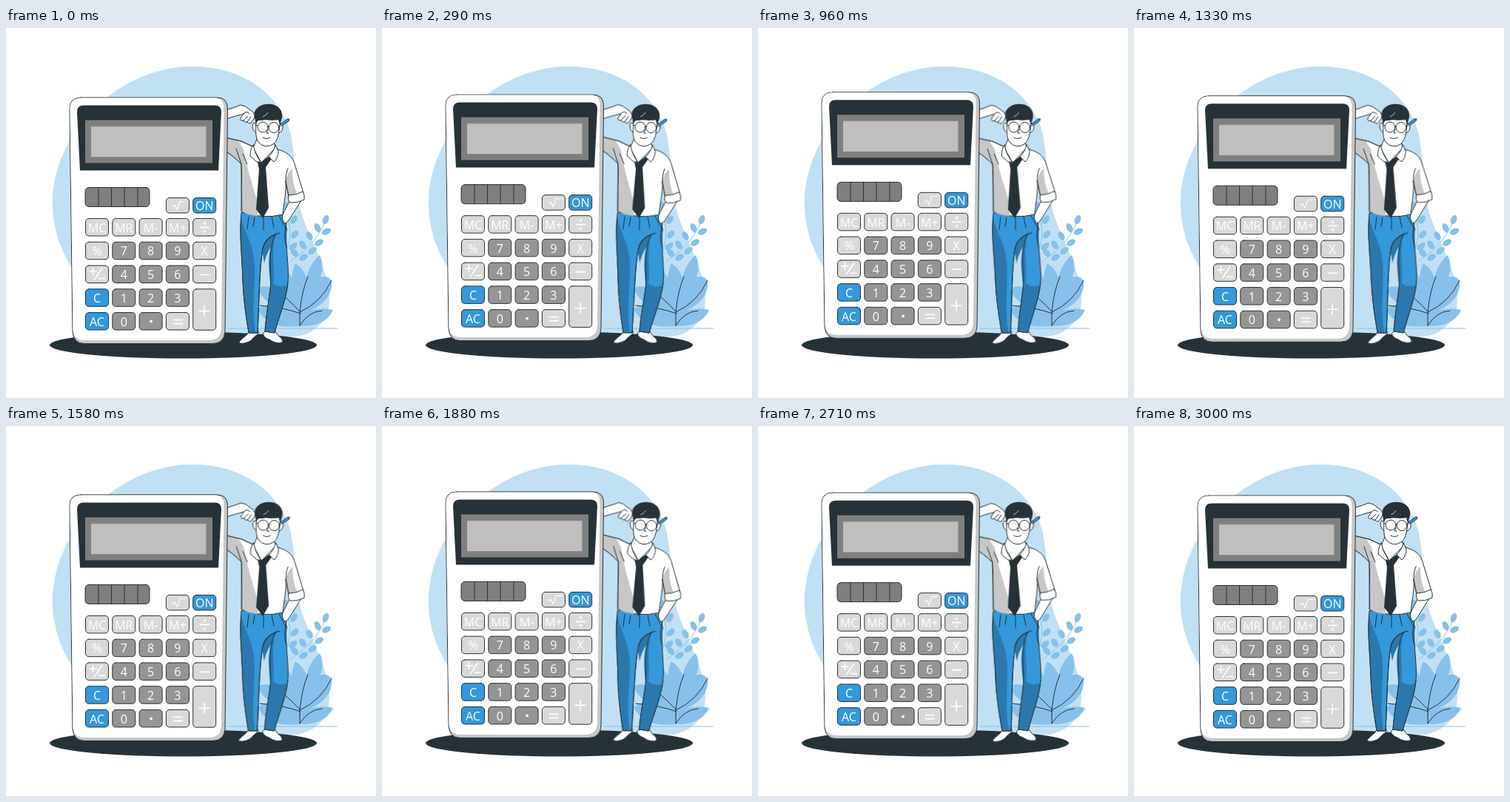
These frames come from a looping animation (500x500 px, 3.04 s). An HTML page:

```html
<!DOCTYPE html>
<html lang="en">
<head>
<meta charset="utf-8">
<title>Calculator</title>
<style>
html, body { margin: 0; width: 100%; height: 100%; overflow: hidden; background: #fff; }
svg { display: block; width: 100vw; height: 100vh; }
#calc { animation: floating 3040ms linear infinite; }
#man { transform-origin: 350px 265px; animation: sway 3040ms linear infinite; }
/* Two 1500 ms cycles, then a 40 ms rest. */
@keyframes floating {
  0%, 49.342%, 98.684%, 100% { transform: translateY(0); }
  24.671%, 74.013% { transform: translateY(-10px); }
}
@keyframes sway {
  0%, 98.684%, 100% { transform: rotate(0deg); }
  12.336%, 61.678% { transform: rotate(1deg); }
  37.007%, 86.349% { transform: rotate(-1deg); }
}
.ink { stroke: #263238; stroke-width: 1; stroke-linecap: round; stroke-linejoin: round; }
.line { fill: none; }
.white { fill: #fff; }
.grey { fill: #c7c7c7; }
.dark { fill: #263238; }
.blue { fill: #3498db; }
.shade { fill: #2a78ae; }
.sign { fill: none; stroke: #fff; stroke-width: 1.6; }
.thin { stroke-width: 1.1; }
text { font: 16px "Open Sans", "Noto Sans", sans-serif; fill: #fff; text-anchor: middle; }
</style>
</head>
<body>
<svg viewBox="0 0 500 500">
  <path fill="#c1e0f4" d="M63 237C63 140 153 52 252 52C316 52 364 84 382 134C393 170 388 213 400 253C413 290 436 329 437 364C438 398 414 418 380 418H210C130 384 63 322 63 237Z"/>

  <g id="plant" fill="#87c1eb">
    <path d="M397 387C384 362 383 334 391 318C399 323 403 329 406 337C409 325 415 314 424 307C429 317 428 328 425 337C431 334 437 337 440 342C442 359 430 374 411 382Q427 377 442 381C435 397 418 404 397 403C375 405 353 404 340 380C347 374 356 374 365 377C352 370 343 362 340 351C354 347 368 350 379 362C374 351 374 335 378 325C390 341 397 362 397 387Z"/>
    <path fill="none" stroke="#87c1eb" d="M384 316C398 305 420 291 433 258M378 304Q389 282 378 240M300 406H448"/>
    <g id="buds"></g>
    <path class="ink line" d="M397 402V384Q400 354 408 336M397 384Q426 371 440 341M398 384Q379 364 365 354M398 386Q378 378 343 375M397 402Q409 383 427 382"/>
  </g>

  <ellipse class="dark" cx="239.5" cy="428.5" rx="180.5" ry="18"/>

  <g id="man">
    <!-- shoes -->
    <path class="ink white" d="M328 410L326 414Q319 420 315 424Q315 427 322 426Q331 424 334 419L341 413V410Z"/>
    <path class="ink white" d="M350 410L347 413Q349 419 356 421Q364 427 373 425Q375 423 372 419Q367 416 364 410Z"/>
    <!-- trousers -->
    <path class="ink blue" d="M318 250C315 276 319 307 320 340C321 369 325 393 328 412H340C342 376 342 328 347 298C350 287 357 282 364 279C352 305 360 329 357 354C354 376 351 394 350 410L363 412C369 389 379 366 381 344C383 321 377 295 379 271L376 250Z"/>
    <path class="shade" d="M318.500 258C322 277 336 293 336 325C336 359 332 384 337 411.500H328.500C325 390 321.500 361 320.500 338C319.500 309 316 285 318.500 258Z"/>
    <path class="shade" d="M368 276C355 282 348 288 346 300L349 318C352 303 359 294 363 288C358 308 364 326 361 345C371 353 377 347 380 348C378 368 368 391 363 411.500L350.500 410C352 389 357 370 357.500 348C355 322 351 299 368 276Z"/>
    <path class="ink line" d="M318 258C315 276 319 307 320 340C321 369 325 393 328 412H340C342 376 342 328 347 298C350 287 357 282 364 279C352 305 360 329 357 354C354 376 351 394 350 410L363 412C369 389 379 366 381 344"/>
    <path class="ink line" d="M328 255L326 272M336 256L334 268M348 256V273M359 255L362 270M347 298C349 286 358 280 370 277M369 254Q376 268 380 273M379 264Q374 282 379 296"/>
    <!-- forearm in pocket -->
    <path class="ink white" d="M383 234L374 252Q372 259 377 264Q380 263 382 260L399 233Z"/>
    <!-- shirt -->
    <path class="ink white" d="M288 146L318 153L333 160L341 163L367 164C381 168 388 174 391 187L402 223L382 228L378 207C379 224 375 238 374 252Q346 259 319 248C319 225 319 204 318 184Q306 171 288 161Z"/>
    <path class="grey" d="M288 146.500L314 152.500L321 164C325 186 331 207 341 238L340 254Q327 253 319.500 248C319.500 225 319.500 204 318.500 184Q306 171 288 160.500Z"/>
    <path class="grey" d="M378 207Q380 196 387 190Q386 206 393 224L382 228Z"/>
    <path class="ink line" d="M288 146L318 153L333 160M288 161Q306 171 318 184V248M318 184L311 163M326 184L320 170M378 208Q378 196 381 190M378 207L382 227"/>
    <path class="ink white" d="M382 226Q392 226 401 221Q404 225 403 232Q394 237 384 236Q380 232 382 226Z"/>
    <!-- neck, tie, collar -->
    <path class="ink white" d="M339 150L334 162L345 182L364 162L361 150Z"/>
    <path class="dark" d="M339 176L344 182L357 172L358 178L351 188L355 243L347 257L338 245L342 191Z"/>
    <path class="ink white" d="M334 158Q330 164 330 173L339 181L344 181Q336 170 334 158ZM364 158Q362 167 355 174L362 181Q368 175 368 167Z"/>
    <!-- head -->
    <path class="ink white" d="M338 129Q333 126 333 133Q334 141 339 141ZM370 129Q375 127 374 135Q373 141 368 142Z"/>
    <path class="ink white" d="M338 120C338 134 336 148 341 154Q350 164 361 157C369 151 369 138 371 122Z"/>
    <path class="dark" d="M338 130L336 121C333 112 341 104 351 103C364 101 375 109 373 121L370 131L368 124C359 126 350 123 346 125Q341 124 339 127Z"/>
    <path fill="none" stroke="#fff" stroke-width=".7" d="M347 120Q352 118 354 114"/>
    <g class="ink" fill="#fff">
      <circle cx="347" cy="134" r="7"/>
      <circle cx="362" cy="134.500" r="7"/>
    </g>
    <path class="ink line" d="M354 133Q355 131 356 133M340 132L337 131M369 133L371 132M354 137L352 142H355M347 148Q352 151 357 148"/>
    <path class="ink blue" d="M371 130L380 123L383 123L382 126L373 132Z"/>
    <!-- raised hand -->
    <path class="ink white" d="M288 116L300 110Q310 107 317 104Q324 105 329 110Q335 113 336 118C336 122 334 124 332 127Q329 131 326 127Q323 128 321 125Q316 126 317 122L321 116L314 118Q303 121 288 126Z"/>
    <path class="ink line" d="M321 116Q325 111 329 116M321 125L327 119M326 127L331 120"/>
  </g>

  <g id="calc">
    <path class="ink" fill="#c7c7c7" d="M101 94H285Q300 94 299.500 110L296 410Q295 426.500 279 426.500H106Q91 426.500 90 410L86 109Q86 94 101 94Z"/>
    <path class="white" d="M101 94.500H283Q295 95 294.500 110L291 406Q290 422 275 422H106Q91 421.500 90.500 408L86.500 109Q86.500 94.500 101 94.500Z"/>
    <path class="dark" d="M105 104.500H282Q291 104.500 291 113L287 192.500H100L96 113Q96 104.500 105 104.500Z"/>
    <path fill="#7f7f7f" d="M107 124.500H279V182.500H107Z"/>
    <path fill="#999" d="M115 132.500H271V174.500H115Z"/>
    <path fill="#bfbfbf" d="M115 133.500H270V174H115Z"/>
    <rect class="ink" x="107" y="215.500" width="87" height="26" rx="5" fill="#7f7f7f"/>
    <path class="ink line" d="M125 215.500V241.500M142.500 215.500V241.500M160 215.500V241.500M178 215.500V241.500"/>
    <g id="keys"></g>
    <path class="sign" d="M112.500 329H122.500M117.500 324V334M119 340.500L130 324.500M125 338.500H134"/>
    <path class="sign thin" d="M225 241.500L228 239.500L231 245.500L235 234.500H243"/>
    <path class="sign" d="M262 269.500H275M262 333.500H275M226 394.500H239M226 399.500H239M260.500 382.500H275.500M268 375V390"/>
    <g class="white">
      <circle cx="268.300" cy="264" r="1.700"/>
      <circle cx="268.300" cy="275" r="1.700"/>
      <circle cx="196" cy="396.500" r="1.900"/>
    </g>
  </g>
</svg>
<script>
const NS = "http://www.w3.org/2000/svg";
function add(parent, tag, attrs, label) {
  const el = document.createElementNS(NS, tag);
  for (const name in attrs) el.setAttribute(name, attrs[name]);
  if (label) el.textContent = label;
  parent.append(el);
}

const keys = document.getElementById("keys");
const light = "#d9d9d9", mid = "#959595", blue = "#3498db";

function key(col, y, fill, label, height = 23.5) {
  const x = 107.5 + col * 36.3;
  add(keys, "rect", { class: "ink", x, y, width: 31, height, rx: 4.5, fill });
  if (label) add(keys, "text", { x: x + 15.5, y: y + height / 2 + 6.5 }, label);
}

key(3, 229.5, light, "", 20.5);
key(4, 229.5, blue, "ON", 20.5);
const rows = [
  ["MC", "MR", "M-", "M+", ""],
  ["%", "7", "8", "9", "X"],
  ["", "4", "5", "6", ""],
  ["C", "1", "2", "3"],
  ["AC", "0", "", ""]
];
rows.forEach((row, r) => row.forEach((label, c) => {
  const number = r > 0 && c > 0 && c < 4 && !(r === 4 && c === 3);
  const fill = r > 2 && c === 0 ? blue : number ? mid : light;
  key(c, 257.5 + r * 31.75, fill, label);
}));
key(4, 352.75, light, "", 55.5);

// x, y, tilt of each small leaf
const buds = [
  [432, 259, 20], [421, 270, -25], [433, 275, 65], [410, 281, -30], [423, 290, 60],
  [401, 293, -35], [414, 301, 55], [390, 304, -40], [402, 310, 60],
  [378, 241, -5], [389, 259, 35], [390, 279, 45], [388, 295, 50]
];
const budGroup = document.getElementById("buds");
for (const [x, y, tilt] of buds)
  add(budGroup, "ellipse", { cx: x, cy: y, rx: 4, ry: 6.5, transform: `rotate(${tilt} ${x} ${y})` });
</script>
</body>
</html>
```
